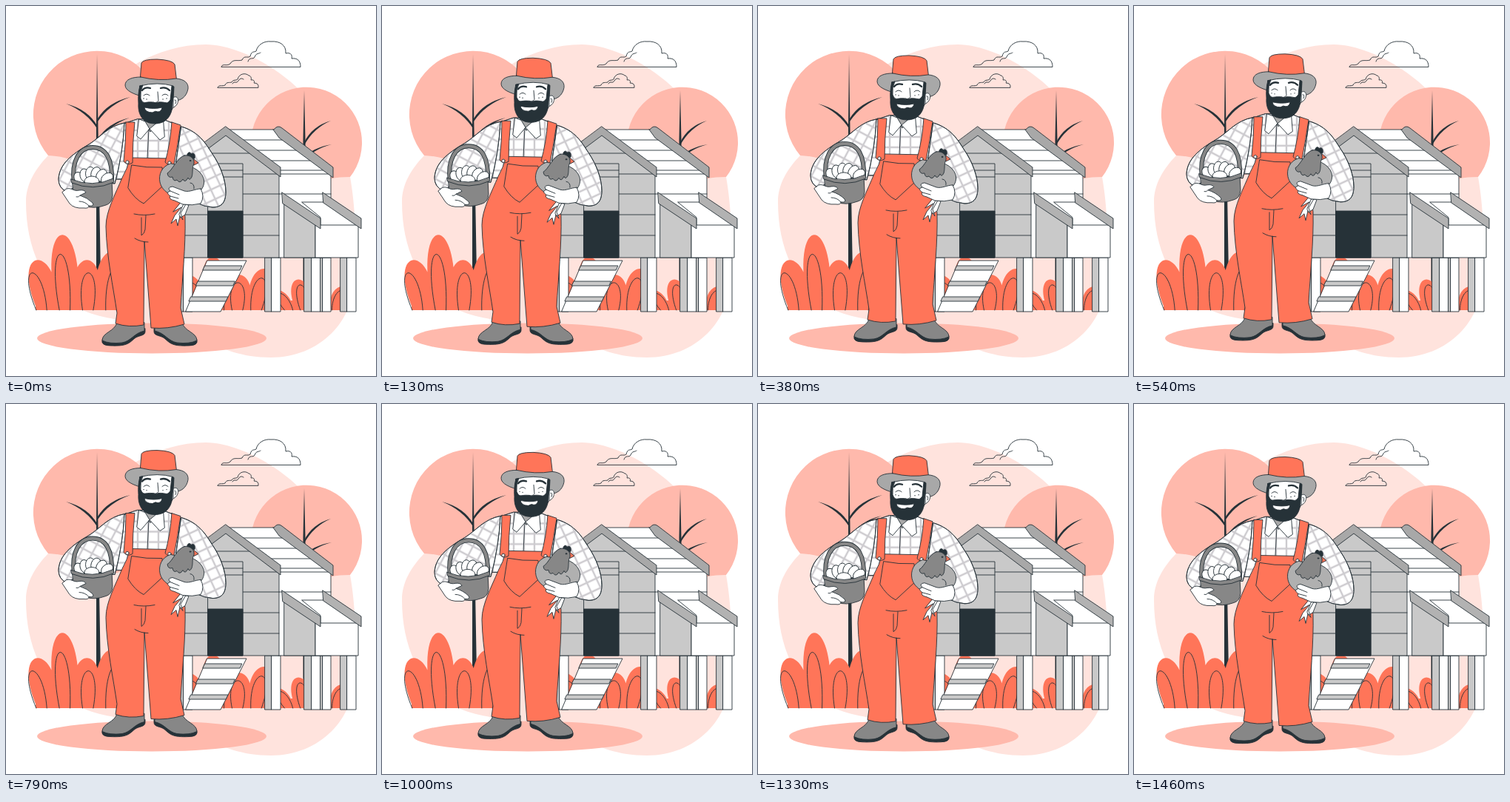
An HTML page that plays this animation: 500 px wide and 500 px high, repeating every 1.5 s.

```html
<!DOCTYPE html>
<html lang="en">
<head>
<meta charset="utf-8">
<style>
html, body { margin: 0; width: 100%; height: 100%; overflow: hidden; background: #fff }
svg { display: block; width: 100%; height: 100% }
.ink { stroke: #263238; stroke-width: .9; stroke-linejoin: round; stroke-linecap: round }
.line { fill: none }
.white { fill: #fff }
.orange { fill: #ff7559 }
.pink { fill: #ffb9ac }
.pale { fill: #ffe3dd }
.dark { fill: #263238 }
.wall { fill: #c9c9c9 }
.mid { fill: #a8a8a8 }
.gray { fill: #878787 }
</style>
</head>
<body>
<svg viewBox="0 0 500 500">
<defs>
  <pattern id="plaid" width="14" height="14" patternUnits="userSpaceOnUse" patternTransform="translate(4 8)">
    <path d="M0 6H14M6 0V14" stroke="#cdcbcf" stroke-width="2.4"/>
  </pattern>
  <pattern id="plaidL" href="#plaid" patternTransform="rotate(28)"/>
  <pattern id="plaidR" href="#plaid" patternTransform="rotate(-25)"/>
  <path id="torso" d="M177 153Q162 158 150 162L143 190L148 234H230L246 176Q236 161 212 153Z"/>
  <path id="armL" d="M160 158C138 162 128 177 112 187C88 201 72 214 71 234Q71 246 82 251L108 236L147 240Q158 200 160 158Z"/>
  <path id="armR" d="M237 163C261 170 270 186 279 200C290 216 297 236 297 251C297 267 290 272 279 272Q267 271 258 266L263 247L246 220L230 212Z"/>
</defs>

<path class="pale" d="M27 265C27 240 40 220 57 202C85 150 130 102 178 77C205 62 236 52 270 52C325 52 435 110 465 231C472 270 474 320 471 366C471 426 424 475 358 475C318 475 292 463 270 452C230 425 140 432 98 408C50 380 27 326 27 265Z"/>
<path class="pink" d="M57 202A86 86 0 1 1 140 231C114 233 108 204 57 202Z"/>
<path class="pink" d="M380 255A75 75 0 1 1 465 231Q450 231 440 233Z"/>
<path class="dark" d="M123 65L124.500 165L128 365L125.500 386L122 365V160ZM403 114L404.500 180L405.500 372L403 381L401.500 370V180Z"/>
<path id="branches" class="dark"/>

<g class="ink line">
  <path d="M291 82C293 77 298 82 303 78C307 71 313 75 319 73C322 66 326 71 330 68C332 60 335 63 338 61C340 52 349 47 358 48C370 47 379 53 378 64C386 62 387 68 386 71C394 70 398 74 398 82ZM327 75C329 68 334 73 336 69C338 63 342 65 344 63"/>
  <path d="M286 110C288 106 292 109 296 107C298 102 302 104 305 103C307 99 311 101 313 99C315 91 324 90 328 94C331 94 332 98 331 100C336 99 336 103 335 104Q342 104 341 110ZM306 105C309 100 311 106 314 101Q317 96 321 99"/>
</g>

<g id="bushes"></g>

<g class="ink">
  <g id="legs"></g>
  <path class="white" d="M272 344H325L290 413H243Z"/>
  <path id="treads" class="wall"/>
  <path class="white" d="M368 220H439V340H368Z"/>
  <path class="line" d="M368 227H439M368 254H439"/>
  <path class="wall" d="M297 171L369 229V340H236V222Z"/>
  <path id="planks" class="line"/>
  <path class="wall" d="M273 213H320V340H273ZM273 222H320M273 231H320"/>
  <path class="dark" d="M273 277H320V340H273Z"/>
  <path class="white" d="M299 167H368L441 222H371Z"/>
  <path id="slats" class="line"/>
  <path class="mid" d="M362 167Q367 160 373 165L442 218V232L369 178L361 167ZM297 163L371 218V231L297 175L250 210V198Z"/>
  <path class="wall" d="M376 266L418 295V340H376Z"/>
  <path class="white" d="M400 265H430L476 295V340H418V296H425V286Z"/>
  <path class="line" d="M418 296H476"/>
  <path fill="#b2b2b2" d="M373 252L425 287V301L374 267ZM428 252L480 287V301L429 266Z"/>
</g>

<ellipse class="pink" cx="197" cy="449" rx="155" ry="20.500"/>

<g id="farmer" class="ink">
  <g id="shoe">
    <path class="dark" d="M130 451Q128 459 141 459C163 460 166 456 174 449C179 445 188 446 188 440V436Z"/>
    <path class="gray" d="M150 428C147 440 130 441 130 452Q140 457 157 455C169 453 173 442 187 439V428Z"/>
  </g>
  <use href="#shoe" transform="matrix(-1 0 0 1 388 0)"/>

  <use href="#torso" fill="#fff"/><use href="#torso" fill="url(#plaid)"/>
  <use href="#armL" fill="#fff"/><use href="#armL" fill="url(#plaidL)"/>

  <path class="orange" d="M168 205L222 206L228 238Q240 258 242 285C243 325 238 370 236 408L241 430Q218 437 196 435L187 318L186 431Q166 435 148 429L150 415C145 380 136 340 135 298C135 277 148 254 157 232Q164 220 168 205Z"/>
  <path class="orange" d="M162 157H174Q171 184 171 212Q164 216 159 210Q162 184 162 157ZM224 157L236 161Q232 188 227 214Q220 217 215 211Q222 186 224 157Z"/>
  <circle class="white" cx="164" cy="211" r="2.200"/><circle class="white" cx="221" cy="212" r="2.200"/>
  <path class="line" d="M170 215Q190 219 211 218L212 243L186 267Q174 261 165 246ZM173 281Q186 284 201 281M189 283L188 302Q187 308 183 310V286M174 314Q182 319 192 319"/>

  <path class="mid" d="M187 148V157L195 170L213 153V145Z"/>
  <path class="white" d="M180 153L188 156L194 166L182 180L177 176ZM212 151L194 166L208 181L214 177Z"/>
  <path class="line" d="M193 167L191 205"/>

  <path class="orange" d="M181 102L183 77Q185 72 204 72Q225 73 228 79L231 104Z"/>
  <path class="mid" d="M182 96Q207 102 230 98C241 99 247 104 246 112C244 123 236 128 228 128C210 128 161 122 161 107C161 99 171 96 182 96Z"/>
  <path class="white" d="M224 125C231 119 235 126 231 133Q226 140 222 136Z"/>
  <path class="white" d="M181 108Q205 102 226 108V137L218 150H186L180 136Z"/>
  <path class="dark" d="M181 108L185 107Q181 115 182 125C186 134 187 129 198 130Q202 132 206 130C217 129 217 134 222 127L224 108L227 109Q227 117 225 131C225 149 216 159 201 159C186 159 178 148 179 132Q178 118 181 108Z"/>
  <path class="white" d="M187 137Q200 140 211 137Q210 143 205 143Q202 141 198 144Q188 144 187 137Z"/>
  <path class="line" d="M205 116L206 128Q203 132 199 130M186 121Q190 117 194 121M211 121Q215 117 219 121M228 127Q231 126 229 132"/>
  <path class="line" d="M184 114Q188 109 195 111M209 111Q216 109 221 114" style="stroke-width:2.3"/>
  <path class="line" d="M186 125h.1M190 126h.1M212 126h.1M217 125h.1" style="stroke-width:1.3"/>

  <path id="handle" class="line" d="M92 238C88 210 99 191 117 191C135 191 144 207 143 236" style="stroke-width:6"/>
  <path class="line" d="M92 238C88 210 99 191 117 191C135 191 144 207 143 236" style="stroke:#878787;stroke-width:4.2"/>
  <g id="eggs" class="white"></g>
  <path class="gray" d="M90 239Q117 247 143 236L144 256Q143 267 135 269Q119 275 106 270Q92 268 91 254Z"/>
  <path class="gray" d="M88 234Q117 246 145 233L146 238Q118 251 89 239Z"/>
  <path class="white" d="M82 247C89 245 91 251 99 249Q106 248 108 252L100 256Q110 259 117 266Q120 271 112 270Q112 274 105 273Q92 274 86 267L76 252Z"/>
  <path class="line" d="M99 264Q107 264 112 270M95 258Q98 259 100 256"/>

  <use href="#armR" fill="#fff"/><use href="#armR" fill="url(#plaidR)"/>
  <path class="white" d="M236 266L243 268L236 280L239 289L235 284L232 297L230 288L223 294L228 283L237 272L226 278ZM240 268L247 269L242 282L236 286L234 282Z"/>
  <path fill="#b0b0b0" d="M222 213C210 217 206 228 208 238C211 252 228 261 247 257C262 255 270 244 267 233Q264 224 254 219Z"/>
  <path class="dark" d="M245 203C244 198 249 196 250 200C254 197 256 201 255 206L249 207Z"/>
  <path class="orange" d="M254 207L260 212L254 215Z"/>
  <path class="gray" d="M241 202C249 201 255 206 254 213C251 219 253 225 251 231Q248 237 246 232Q242 240 239 234Q235 241 231 235Q226 238 225 231Q219 233 218 226C225 222 231 205 241 202Z"/>
  <circle class="dark" cx="249" cy="209" r=".8"/>
  <path class="white" d="M263 247C256 247 248 252 241 250L225 244Q217 245 222 250Q215 252 222 257Q219 261 228 263L239 268Q252 270 263 267Q269 257 263 247Z"/>
  <path class="line" d="M222 250L234 255M222 257L233 260M254 247Q255 240 249 239"/>
</g>
</svg>
<script>
const $ = id => document.getElementById(id);
const repeat = (n, draw) => Array.from({ length: n }, (_, i) => draw(i)).join('');
const setPath = (id, d) => $(id).setAttribute('d', d);

// Thin tapered twig leaving a trunk at (x, y)
const twig = (x, y, dx, dy) =>
  `M${x + dx} ${y - dy}Q${x + dx * .3} ${y - dy * .75} ${x} ${y}v4Q${x + dx * .35} ${y - dy * .65} ${x + dx} ${y - dy}Z`;
setPath('branches', twig(124, 163, -43, 31) + twig(124, 152, 44, 29) + twig(124, 180, 43, 29) +
  twig(403, 184, 36, 29) + twig(403, 205, 37, 18));

// Row of leaves fanning outwards, tall and short in turn
const GROUND = 411;
function clump(left, right, height, width, n = 4) {
  return repeat(n, i => {
    const u = i / (n - 1), x = left + u * (right - left), tip = x + (u - .6) * 26;
    const top = GROUND - height * (i % 2 ? 1 - .1 * i : .6) / .75;
    return `M${x - width * .8} ${GROUND}C${tip - width * 2.2} ${top} ${tip + width * 2} ${top} ${x + width * .8} ${GROUND}`;
  });
}
$('bushes').innerHTML =
  `<path class="orange" d="M40 411V398H150V411ZM243 411V398H455V411Z${clump(56, 136, 113, 17)}${clump(258, 342, 80, 16)}${clump(378, 448, 46, 12)}"/>` +
  `<path class="ink line" d="${clump(48, 142, 84, 9)}${clump(262, 338, 62, 9)}${clump(382, 446, 38, 7)}"/>`;

const post = (x, gray, white) =>
  `<path class="wall" d="M${x} 340h${gray}v73h${-gray}Z"/><path class="white" d="M${x + gray} 340h${white}v73h${-white}Z"/>`;
$('legs').innerHTML = post(236, 4, 12) + post(350, 9, 12) + post(403, 10, 12) + post(425, 3, 11) + post(452, 9, 12);

const rampX = (top, y) => top - (y - 344) * .45;
setPath('treads', repeat(3, i => {
  const y = 351 + 21 * i;
  return `M${rampX(272, y)} ${y}H${rampX(322, y)}L${rampX(322, y + 6)} ${y + 6}H${rampX(272, y + 6)}Z`;
}));
setPath('planks', 'M258 199H332M320 227H366' + repeat(3, i => `M236 ${254 + 28 * i}H369`));
setPath('slats', repeat(3, i => `M${318 + 19 * i} ${181 + 14 * i}h70`));

$('eggs').innerHTML = repeat(6, i => {
  const x = 99 + i * 7.5, y = 233 - 7 * Math.sin(i * Math.PI / 5);
  return `<ellipse cx="${x}" cy="${y}" rx="6.500" ry="9" transform="rotate(${i * 16 - 30} ${x} ${y})"/>`;
}) + '<ellipse cx="116" cy="237" rx="10" ry="7"/>';

function frame() {
  const p = performance.now() / 1500 % 1;
  $('farmer').setAttribute('transform', `translate(0 ${-20 * Math.min(p, 1 - p)})`);
  requestAnimationFrame(frame);
}
frame();
</script>
</body>
</html>
```
